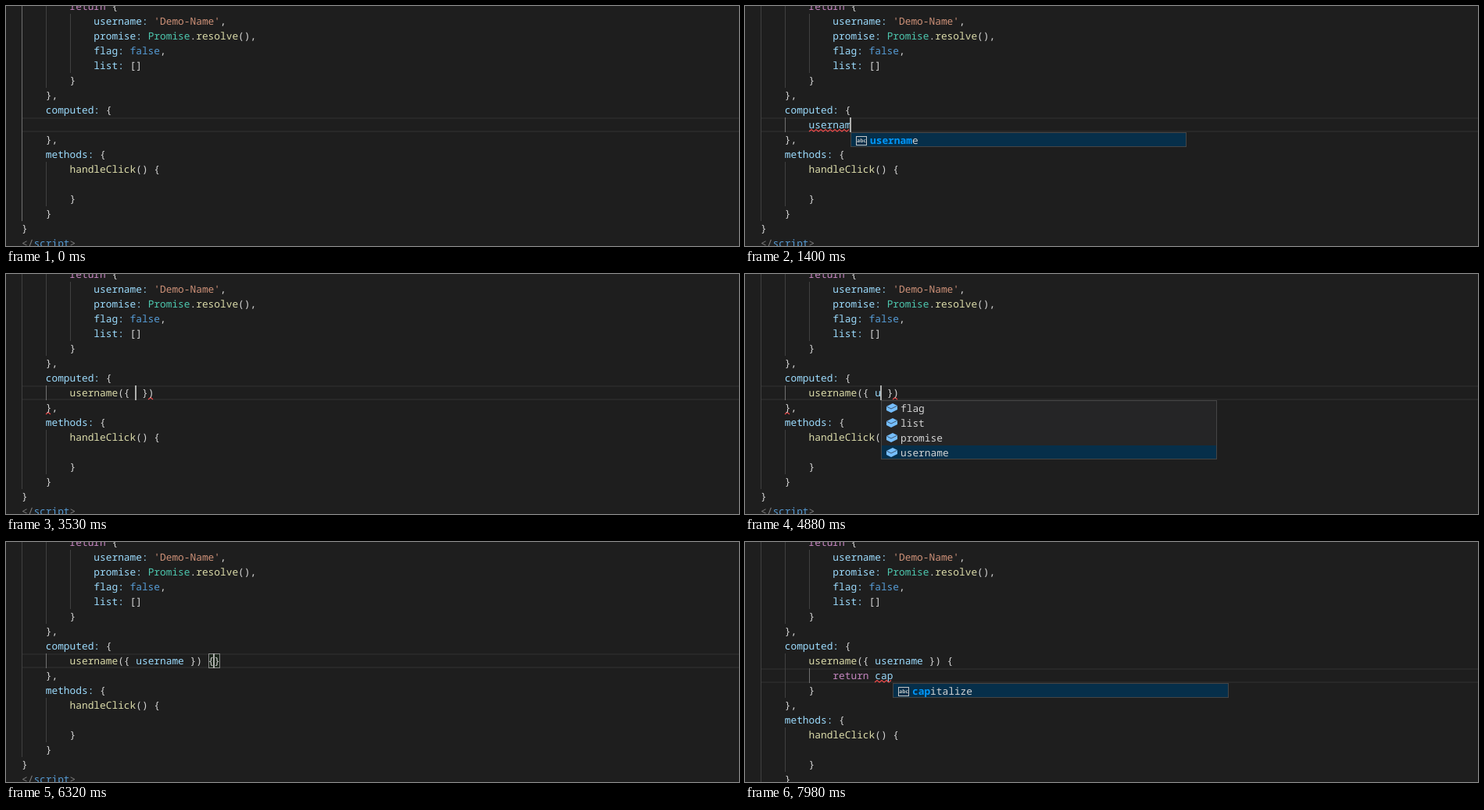
These frames come from a looping animation (938 by 308 pixels, 8 s). An HTML page:

```html
<!DOCTYPE html>
<html lang="en">
<head>
<meta charset="utf-8">
<title>Code editor</title>
<style>
  html, body { margin: 0; width: 100%; height: 100%; overflow: hidden; background: #1e1e1e; }
  svg { display: block; width: 938px; height: 308px; }
  text { font: 12.83px "Noto Sans Mono", "DejaVu Sans Mono", monospace; fill: #d4d4d4; white-space: pre; text-rendering: geometricPrecision; }
  .hit { fill: #0097fb; font-weight: bold; }
  .abc { font: bold 6.6px "Noto Sans", sans-serif; fill: #c5c5c5; }
</style>
</head>
<body>
<svg id="stage" viewBox="0 0 938 308"></svg>
<script>
(() => {
const LOOP = 8000, LINE = 19, CHAR = 7.697, LEFT = 20, POPUP_WIDTH = 430;
const stage = document.getElementById('stage');

const head = `        return {
            username: 'Demo-Name',
            promise: Promise.resolve(),
            flag: false,
            list: []
        }
    },
    computed: {`.split('\n');
const tail = `    },
    methods: {
        handleClick() {

        }
    }
}
</`.split('\n');
tail[tail.length - 1] += 'script>';

// ---- timeline: each step patches the editor state ----
const steps = [[0, { live: '', row: 8, col: 8, on: false, popup: null, errors: [], pair: [] }]];
const at = (time, patch) => steps.push([time, patch]);
const pad = ' '.repeat(8);
const list = (items, match = '', selected = 0, icon = 'abc') => ({ items, match, selected, icon });
const method = (text, col, more = {}) => ({ live: pad + text, col, on: true, ...more });
const braceError = [9, 4, 1];

at(470, { on: true });
[790, 890, 990, 1080, 1160, 1240, 1320, 1410].forEach((time, i) => {
  const word = 'username'.slice(0, i + 1);
  const items = i < 4 ? ['username', 'User'] : ['username'];
  at(time, method(word, 9 + i, { popup: list(items, word), errors: i > 1 ? [[8, 8, i + 1]] : [] }));
});
at(1910, { on: false });
at(2020, method('username()', 17));
at(2070, { popup: null });
at(2100, { pair: [16, 17] });
at(2150, { errors: [braceError] });
at(2430, method('username({})', 18, { pair: [] }));
at(2480, { pair: [17, 18] });
at(2890, { errors: [braceError, [8, 19, 1]] });
at(2940, { on: false });
at(3220, method('username({ })', 19, { pair: [17, 19], errors: [braceError, [8, 20, 1]] }));
at(3350, method('username({  })', 20, { pair: [17, 20], errors: [braceError, [8, 21, 1]] }));
at(3500, { col: 19 });
at(3530, { pair: [] });
at(3960, { on: false });

const fields = ['flag', 'list', 'promise', 'username'];
at(4370, { popup: list(fields, '', 3, 'field') });
at(4470, { on: true });
[4880, 5010, 5110, 5210].forEach((time, i) => {
  const word = 'user'.slice(0, i + 1);
  at(time, method(`username({ ${word} })`, 20 + i, { errors: [braceError, [8, 22 + i, 1]] }));
  at(time + 50, { popup: list(['username'], word, 0, 'field') });
});
at(5410, method('username({ username })', 27, { popup: null, errors: [braceError] }));
at(5860, { col: 30 });
at(5910, { pair: [16, 29] });
at(6000, method('username({ username }) ', 31));
at(6040, { pair: [] });
at(6270, method('username({ username }) {}', 32));
at(6320, { pair: [31, 32], errors: [] });

const body = (text, more = {}) => ({
  live: `${pad}username({ username }) {\n${pad}    ${text}\n${pad}}`,
  row: 9, col: 12 + text.length, on: true, ...more
});
at(6420, body('', { pair: [] }));
[6520, 6600, 6680, 6760, 6840, 6920].forEach((time, i) => {
  const word = 'return'.slice(0, i + 1);
  at(time, body(word, { popup: list(i < 2 ? ['return', 'resolve'] : ['return'], word) }));
});
at(7050, body('return '));
at(7100, { popup: null });
at(7330, body('return c'));
at(7380, { popup: list(['capitalize', 'computed', 'handleClick'], 'c') });
at(7420, body('return ca', { popup: list(['capitalize'], 'ca') }));
at(7480, body('return cap'));
at(7530, { popup: list(['capitalize'], 'cap') });
at(7630, { errors: [[9, 19, 3]] });
at(7980, { on: false });
steps.sort((a, b) => a[0] - b[0]);

// ---- drawing ----
const lineTop = row => row * LINE - 9;
const colX = col => LEFT + col * CHAR;
const caretX = col => Math.floor(LEFT - 0.5 + col * CHAR);
const escapeText = s => s.replace(/&/g, '&amp;').replace(/</g, '&lt;');
const rect = (x, y, w, h, fill, extra = '') =>
  `<rect x="${x}" y="${y}" width="${w}" height="${h}" fill="${fill}" ${extra}/>`;

const tokens = /(<\/|>)|(return\b)|('[^']*')|(Promise)|(false|script)|(\w+(?=\())|(\w+:?)|[^\w\s]/g;
const colors = ['#808080', '#c586c0', '#ce9178', '#4ec9b0', '#569cd6', '#dcdcaa', '#9cdcfe'];

function codeLine(line, row) {
  const spans = [...line.matchAll(tokens)].map(m => {
    const fill = colors[m.slice(1).findIndex(Boolean)] || '#d4d4d4';
    return `<tspan x="${colX(m.index)}" style="fill:${fill}">${escapeText(m[0])}</tspan>`;
  });
  return `<text y="${lineTop(row) + 14}">${spans.join('')}</text>`;
}

function guides(lines, active) {
  const indent = lines.map(l => l.search(/\S/));
  for (let i = lines.length - 1; i >= 0; i--) if (indent[i] < 0) indent[i] = indent[i + 1];
  const activeCol = indent[active] - 4;
  let from = active, to = active;
  while (indent[from - 1] > activeCol) from--;
  while (indent[to + 1] > activeCol) to++;
  return indent.map((n, row) => {
    let out = '';
    for (let col = 0; col < n; col += 4) {
      const bright = col === activeCol && row >= from && row <= to;
      out += rect(Math.round(colX(col)), lineTop(row), 1, LINE, bright ? '#707070' : '#404040');
    }
    return out;
  }).join('');
}

function squiggle([row, col, length]) {
  const x = Math.round(colX(col)), end = Math.round(colX(col + length)), y = lineTop(row) + 15.5;
  let d = `M${x} ${y + 2.5}`;
  for (let i = 1; x + i * 3 <= end; i++) d += `L${x + i * 3} ${y + (i % 2 ? 0 : 2.5)}`;
  return `<path d="${d}" fill="none" stroke="#f14c4c" stroke-width="1.1"/>`;
}

const icons = {
  abc: (x, y) => rect(x + 7.5, y + 4.5, 13, 11, 'none', 'stroke="#c5c5c5"') +
    `<text class="abc" x="${x + 14}" y="${y + 12.3}" text-anchor="middle">abc</text>`,
  field: (x, y) => `<g transform="translate(${x + 6} ${y + 2})">
    <path d="M9 1L1 5v5l6 3 8-4V4z" fill="#75beff"/>
    <path d="M1.5 5.2L7 8l7.5-3.8" fill="none" stroke="#252526" stroke-width=".7"/></g>`
};

function popupBox({ items, match, selected, icon }, row, col) {
  const x = caretX(col) + 1, y = lineTop(row + 1), height = items.length * LINE;
  const rows = items.map((item, i) => {
    const rowY = y + 1 + i * LINE;
    const start = match ? item.toLowerCase().indexOf(match.toLowerCase()) : 0;
    const end = start + match.length;
    const mark = i === selected
      ? rect(x + 1, rowY, POPUP_WIDTH - 2, Math.min(LINE, y + height - 1 - rowY), '#062f4a') : '';
    return mark + icons[icon](x, rowY) + `<text x="${x + 25}" y="${rowY + 14}">${item.slice(0, start)}` +
      `<tspan class="hit">${item.slice(start, end)}</tspan>${item.slice(end)}</text>`;
  });
  return rect(x, y, POPUP_WIDTH, height, '#252526') + rows.join('') +
    rect(x + 0.5, y + 0.5, POPUP_WIDTH - 1, height - 1, 'none', 'stroke="#454545"');
}

function bracketBox(row, col) {
  const x = Math.round(colX(col)), width = Math.round(colX(col + 1)) - x;
  return rect(x + 0.5, lineTop(row) + 0.5, width - 1, LINE - 1, '#006400', 'fill-opacity=".1" stroke="#888"');
}

function draw({ live, row, col, on, popup, errors, pair }) {
  const lines = [...head, ...live.split('\n'), ...tail];
  const y = lineTop(row);
  stage.innerHTML = [
    rect(0, 0, 938, 308, '#1e1e1e'),
    rect(LEFT, y, 918, 2, '#282828'),
    rect(LEFT, y + 17, 918, 2, '#282828'),
    guides(lines, row),
    ...pair.map(c => bracketBox(row, c)),
    ...errors.map(squiggle),
    ...lines.map(codeLine),
    on ? rect(caretX(col), y, 2, LINE, '#aeafad') : '',
    popup ? popupBox(popup, row, col) : ''
  ].join('');
}

const begin = performance.now();
let shown = 0;
function tick() {
  const time = Math.max(0, performance.now() - begin) % LOOP;
  const past = steps.filter(s => s[0] <= time);
  if (past.length !== shown) {
    shown = past.length;
    draw(Object.assign({}, ...past.map(s => s[1])));
  }
  requestAnimationFrame(tick);
}
tick();
})();
</script>
</body>
</html>
```
